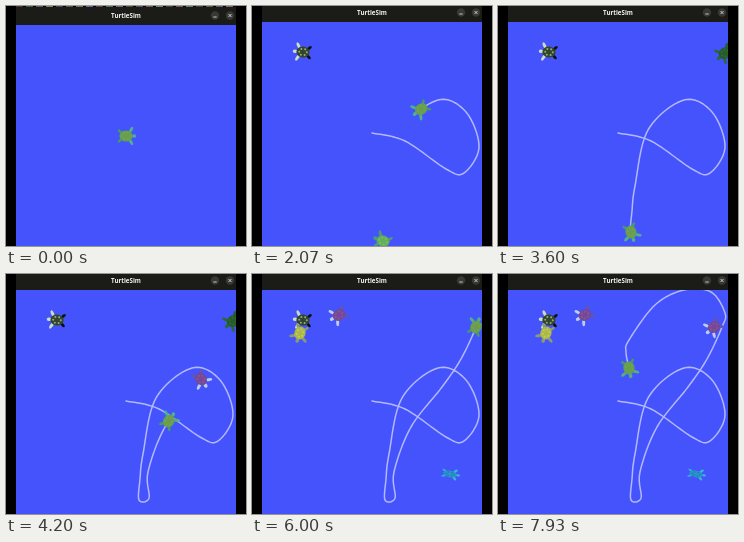
Write an HTML page with a canvas that moves like this. It is 240 by 240 pixels and loops after 8 s.

```html
<!DOCTYPE html>
<html lang="en">
<head>
<meta charset="utf-8">
<title>TurtleSim</title>
<style>
  html, body { margin: 0; width: 100%; height: 100%; overflow: hidden; background: #000; }
  canvas { display: block; width: 100vw; height: 100vh; }
</style>
</head>
<body>
<canvas></canvas>
<script>
const SIZE = 240, LOOP = 8000, FPS = 15;
const POND = { x: 10, y: 16, w: 220, h: 224 };
const canvas = document.querySelector('canvas');
const ctx = canvas.getContext('2d');

const SKINS = {
  hero: { shell: '#62a052', mark: '#8f9a48', front: '#4fb08c', back: '#449a68' },
  dark: { shell: '#33452c', mark: '#8fae78', front: '#cfdcc4', back: '#0c100c' },
  purple: { shell: '#74489c', mark: '#91587f', front: '#bccdf0', back: '#6656a8' },
  forest: { shell: '#245c2c', mark: '#3a6b2c', front: '#2a6a38', back: '#245c2c' },
  lime: { shell: '#5fae5c', mark: '#8fb860', front: '#4a9c74', back: '#4a9c74' },
  yellow: { shell: '#abb94a', mark: '#c8cf58', front: '#8a9a78', back: '#8a9a78' },
  teal: { shell: '#2a94cc', mark: '#2078a8', front: '#38b8d2', back: '#2fb0d0', flat: 0.6 },
};

// Turtles in order of appearance; those with a `via` are chased and caught at `until`.
const TURTLES = [
  { skin: 'purple', x: 203, y: 171, turn: 145, from: 480, until: 1560, via: [[153, 135], [194, 163]] },
  { skin: 'dark', x: 51, y: 46, turn: 185, from: 1100 },
  { skin: 'lime', x: 131, y: 235, turn: 200, from: 1560, until: 3400,
    via: [[212, 167], [227, 141], [214, 106], [186, 94], [150, 124], [137, 180], [134, 205], [133, 226]] },
  { skin: 'forest', x: 227, y: 47, turn: 140, from: 2300, until: 6000, via: [[209, 85], [224, 53]] },
  { skin: 'purple', x: 195, y: 105, turn: 55, from: 3700, until: 5070,
    via: [[143, 224], [142, 198], [159, 153], [190, 113]] },
  { skin: 'purple', x: 87, y: 41, turn: 150, from: 4300 },
  { skin: 'yellow', x: 48, y: 59, turn: 110, from: 5000 },
  { skin: 'teal', x: 198, y: 200, turn: 10, from: 5700 },
  { skin: 'purple', x: 126, y: 71, turn: 30, from: 6030, until: 7300,
    via: [[227, 39], [213, 18], [186, 16], [157, 31], [131, 66]] },
  { skin: 'forest', x: 133, y: 101, turn: 100, from: 6700, until: 7900, via: [[128, 78], [131, 94]] },
  { skin: 'purple', x: 216, y: 53, turn: 140, from: 7400 },
];

const spline = (a, b, c, d, u) =>
  b + 0.5 * u * (c - a + u * (2 * a - 5 * b + 4 * c - d + u * (3 * (b - c) + d - a)));

// A chase slows down in proportion to the distance left.
function buildTrack() {
  const goals = TURTLES.filter(g => g.via).sort((a, b) => a.until - b.until);
  const knots = [[120, 127], ...goals.flatMap(g => g.via)];
  const knot = i => knots[Math.max(0, Math.min(knots.length - 1, i))];
  let last = { t: 0, x: 120, y: 127, angle: 0 }, k = 0;
  const track = [last];
  for (const goal of goals) {
    const start = Math.max(last.t, goal.from);
    const leg = [{ ...last, cost: 0 }];
    for (const _ of goal.via) {
      const around = [-1, 0, 1, 2].map(i => knot(k + i));
      for (let j = 1; j <= 12; j++) {
        const prev = leg[leg.length - 1];
        const [x, y] = [0, 1].map(axis => spline(...around.map(p => p[axis]), j / 12));
        const dx = x - prev.x, dy = y - prev.y;
        const left = Math.hypot(goal.x - x, goal.y - y);
        leg.push({ x, y, angle: Math.atan2(dy, dx), cost: prev.cost + Math.hypot(dx, dy) / (left + 1) });
      }
      k++;
    }
    last = leg[leg.length - 1];
    for (const p of leg) p.t = start + (goal.until - start) * p.cost / last.cost;
    track.push(...leg);
  }
  return track;
}
const track = buildTrack();

function ellipse(x, y, rx, ry, turn, color) {
  ctx.fillStyle = color;
  ctx.beginPath();
  ctx.ellipse(x, y, rx, ry, turn, 0, 2 * Math.PI);
  ctx.fill();
}

function drawTurtle(x, y, angle, { shell, mark, front, back, flat = 1 }) {
  ctx.save();
  ctx.translate(x, y);
  ctx.rotate(angle);
  ctx.scale(1, flat);
  for (const side of [-1, 1]) {
    ellipse(5, side * 6, 1.5, 3.5, side * -0.5, front);
    ellipse(-6, side * 4.5, 2.8, 1.4, side * -0.7, back);
  }
  ellipse(8, 0, 2.3, 1.8, 0, front);
  ellipse(0, 0, 6.6, 5.6, 0, shell);
  for (let i = 0; i < 6; i++) {
    const a = i * Math.PI / 3;
    ellipse(3.8 * Math.cos(a), 3.3 * Math.sin(a), 1, 1, 0, mark);
  }
  ctx.restore();
}

function heroAt(t) {
  const next = track.findIndex(p => p.t > t);
  if (next < 0) return { ...track[track.length - 1], passed: track };
  const a = track[next - 1], b = track[next], u = (t - a.t) / (b.t - a.t);
  return {
    x: a.x + (b.x - a.x) * u,
    y: a.y + (b.y - a.y) * u,
    angle: b.angle,
    passed: track.slice(0, next),
  };
}

function drawTrail({ x, y, passed }) {
  ctx.strokeStyle = '#b3b8ff';
  ctx.lineWidth = 1.5;
  ctx.lineJoin = ctx.lineCap = 'round';
  ctx.beginPath();
  for (const p of passed) ctx.lineTo(p.x, p.y);
  ctx.lineTo(x, y);
  ctx.stroke();
}

function drawTitleBar() {
  ctx.fillStyle = '#1b1b18';
  ctx.fillRect(POND.x, -2, POND.w, POND.y + 2);
  ctx.fillStyle = '#f4f4f4';
  ctx.font = 'bold 6.2px "Open Sans", "Noto Sans", sans-serif';
  ctx.textAlign = 'center';
  ctx.textBaseline = 'middle';
  ctx.fillText('TurtleSim', 120, 7);
  for (const x of [209, 224]) ellipse(x, 6.5, 4.2, 4.2, 0, '#383836');
  ctx.strokeStyle = '#e8e8e8';
  ctx.lineWidth = 0.8;
  ctx.lineCap = 'butt';
  ctx.stroke(new Path2D('M207.3 8h3.4M222.5 5l3 3m0-3l-3 3'));
}

function drawDesktopEdge() {
  for (let i = 0; i < 22; i++) {
    ctx.fillStyle = `hsl(${i * 137} 15% ${25 + i * 7 % 25}%)`;
    ctx.fillRect(POND.x + i * 10, 0, 7, 1.5);
  }
}

function draw(t) {
  const ratio = devicePixelRatio || 1;
  const w = Math.round(innerWidth * ratio), h = Math.round(innerHeight * ratio);
  if (canvas.width !== w || canvas.height !== h) { canvas.width = w; canvas.height = h; }
  ctx.setTransform(w / SIZE, 0, 0, h / SIZE, 0, 0);
  ctx.fillStyle = '#000';
  ctx.fillRect(0, 0, SIZE, SIZE);

  ctx.save();
  if (t < 300) {
    drawDesktopEdge();
    ctx.translate(0, 3);
  }
  drawTitleBar();
  ctx.beginPath();
  ctx.rect(POND.x, POND.y, POND.w, POND.h);
  ctx.clip();
  ctx.fillStyle = '#4553fc';
  ctx.fillRect(POND.x, POND.y, POND.w, POND.h);
  const hero = heroAt(t);
  drawTrail(hero);
  for (const { skin, x, y, turn, from, until = LOOP } of TURTLES) {
    if (t >= from && t < until) drawTurtle(x, y, turn * Math.PI / 180, SKINS[skin]);
  }
  drawTurtle(hero.x, hero.y, hero.angle, SKINS.hero);
  ctx.restore();
}

const began = performance.now();
function tick() {
  const t = (performance.now() - began) % LOOP;
  draw(Math.floor(t * FPS / 1000 + 0.1) * 1000 / FPS);
  requestAnimationFrame(tick);
}
tick();
</script>
</body>
</html>
```
